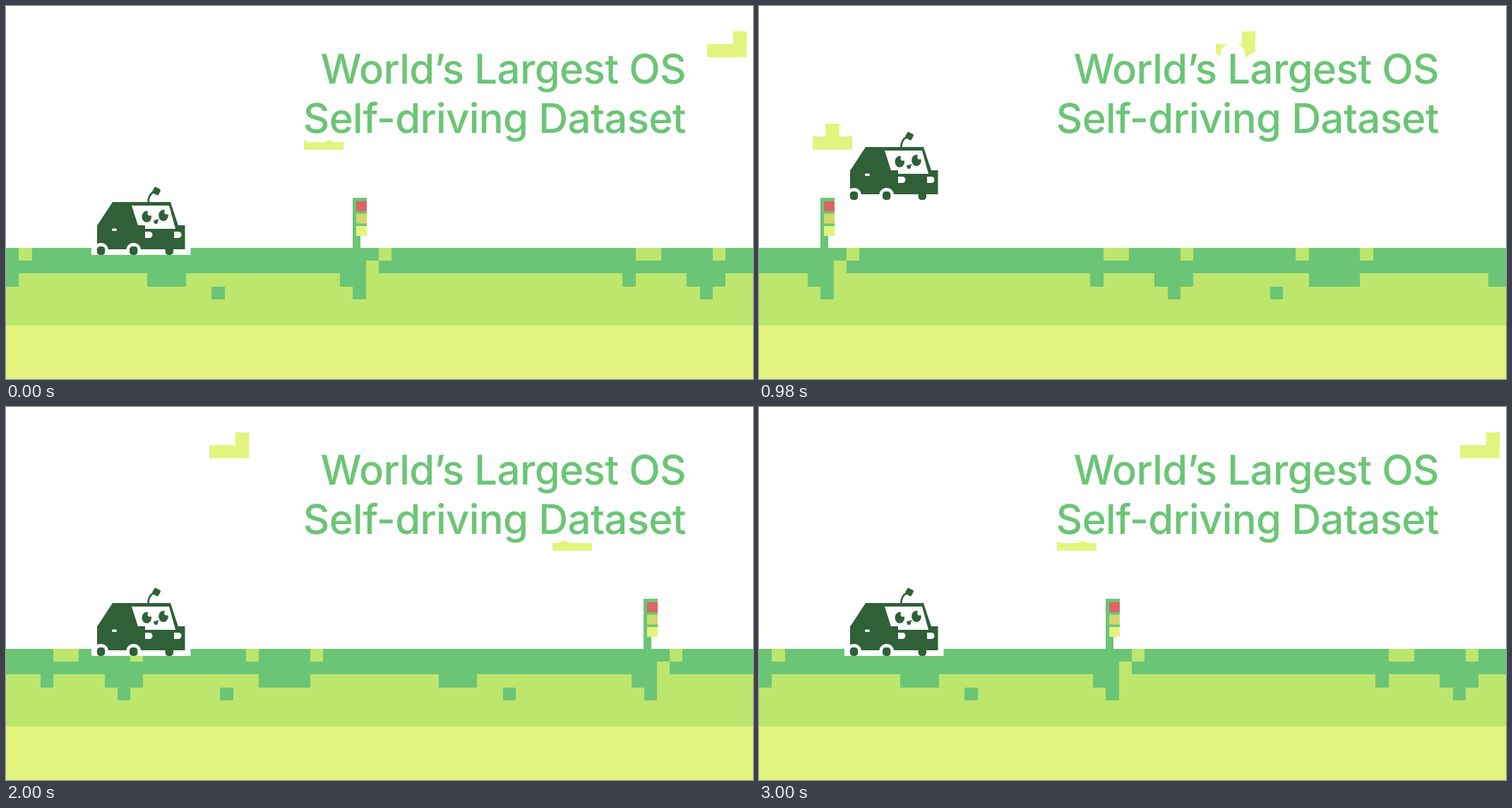
An HTML page with a canvas for the animation above (3040 ms loop, 1058 by 529 pixels).

```html
<!DOCTYPE html>
<html lang="en">
<head>
<meta charset="utf-8">
<title>Self-driving dataset</title>
<style>
  html, body { margin: 0; width: 100%; height: 100%; overflow: hidden; background: #fff; }
  canvas { display: block; }
</style>
</head>
<body>
<canvas id="stage" width="1058" height="529"></canvas>
<script>
const ctx = document.getElementById('stage').getContext('2d');
const W = 1058, H = 529;
const LOOP = 3040, TRAVEL = 3000, STEP = 20;
const GROUND = 1237, UNIT = GROUND / 68, SURFACE = 343;

const GREEN = '#6bc576', LEAF = '#bde66d', LIME = '#e2f47e';
const DARK = '#2f6037', RED = '#de6467', AMBER = '#d0d96c', WHITE = '#fff';

function box(color, x, y, w, h) {
  ctx.fillStyle = color;
  ctx.fillRect(x, y, w, h);
}

function oval(color, x, y, rx, ry = rx) {
  ctx.fillStyle = color;
  ctx.beginPath();
  ctx.ellipse(x, y, rx, ry, 0, 0, Math.PI * 2);
  ctx.fill();
}

function pill(color, x, y, w, h, radii) {
  ctx.fillStyle = color;
  ctx.beginPath();
  ctx.roundRect(x, y, w, h, radii);
  ctx.fill();
}

// Quadrilateral with level top and bottom edges
function trapezoid(top, topLeft, topRight, bottom, left, right) {
  const path = new Path2D();
  path.moveTo(topLeft, top);
  path.lineTo(topRight, top);
  path.lineTo(right, bottom);
  path.lineTo(left, bottom);
  path.closePath();
  return path;
}

// Calls draw for every visible copy of a strip that repeats each period
function repeat(x, period, draw) {
  for (const shift of [-period, 0, period]) draw(x + shift);
}

function cloud(x, y, bump) {
  x = Math.round(x);
  box(LIME, x, y + 18, 56, 18.7);
  box(LIME, x + bump, y, 19.5, 18);
}

function drawClouds(p) {
  repeat(993 - p * W, W, x => cloud(x, 36, 36.7));
  repeat(421.7 - p * W, W, x => cloud(x, 167, 18.3));
}

// The white halo hides passing clouds down to the lower line's edge
function drawTitle() {
  const lines = ['World’s Largest OS', 'Self-driving Dataset'];
  const eachLine = draw => lines.forEach((text, i) => draw(text, 963, 110 + 70 * i));
  ctx.font = '500 58px Inter, sans-serif';
  ctx.letterSpacing = '-0.58px';
  ctx.fontKerning = 'normal';
  ctx.textRendering = 'geometricPrecision';
  ctx.textAlign = 'right';
  ctx.lineJoin = 'round';
  ctx.lineWidth = 28;
  ctx.strokeStyle = WHITE;
  ctx.save();
  ctx.beginPath();
  ctx.rect(0, 0, W, 193);
  ctx.clip();
  eachLine((...line) => ctx.strokeText(...line));
  ctx.restore();
  ctx.fillStyle = GREEN;
  eachLine((...line) => ctx.fillText(...line));
}

function drawLight(x) {
  x = Math.round(x);
  box(GREEN, x, 272, 20, 54);
  box(GREEN, x, 326, 11, 18);
  [RED, AMBER, LIME].forEach((lamp, i) => box(lamp, x + 5, 277 + 17.5 * i, 15, 14));
}

function drawGround(p) {
  const shift = p * GROUND;
  const rowY = row => Math.round(SURFACE + row * UNIT);

  const tile = (color, row, col, width = 1) =>
    repeat(col * UNIT + 0.3 - shift, GROUND, x => {
      const left = Math.round(x), right = Math.round(x + width * UNIT);
      box(color, left, rowY(row), right - left, rowY(row + 1) - rowY(row));
    });
  const sprout = (col, width) => tile(LEAF, 0, col, width);
  const speck = col => tile(GREEN, 3, col);
  const notch = (col, width) => tile(GREEN, 2, col, width);
  const root = (col, width) => { notch(col, width); speck(col + 1); };

  box(GREEN, 0, SURFACE, W, 37);
  box(LEAF, 0, rowY(2), W, 453 - rowY(2));
  box(LIME, 0, 453, W, H - 453);

  notch(11, 3);
  speck(16);

  root(26, 2);
  tile(LEAF, 1, 28);
  sprout(29);

  notch(48, 1);
  sprout(49, 2);

  root(53, 3);
  sprout(55);

  speck(62);
  sprout(64);
  notch(65, 4);
  sprout(69);

  repeat(491 - shift, GROUND, drawLight);
}

const clamp = v => Math.min(1, Math.max(0, v));

function jump(t) {
  const rise = clamp((t - 420) / 240), fall = clamp((t - 850) / 240);
  return 110 * (1 - (1 - rise) ** 2 - fall ** 2);
}

function drawBody() {
  const cabin = trapezoid(278, 151, 233, 311.5, 129, 244);
  const hull = trapezoid(311, 129, 253.5, 345, 129, 253.5);
  ctx.lineJoin = 'miter';
  ctx.lineWidth = 16;
  ctx.strokeStyle = WHITE;
  for (const part of [cabin, hull]) ctx.stroke(part);
  ctx.fillStyle = DARK;
  for (const part of [cabin, hull]) ctx.fill(part);

  ctx.fillStyle = WHITE;
  ctx.fill(trapezoid(283, 178, 231, 316, 188.5, 240));
  box(DARK, 186, 311, 11, 5);
}

function drawAntenna() {
  ctx.strokeStyle = DARK;
  ctx.lineWidth = 2.6;
  ctx.beginPath();
  ctx.moveTo(201.3, 279);
  ctx.quadraticCurveTo(201.5, 267, 210, 263.5);
  ctx.stroke();
  ctx.save();
  ctx.translate(213, 262.5);
  ctx.rotate(0.5);
  pill(DARK, -5, -4.7, 10, 9.4, 2);
  ctx.restore();
}

function drawEye(x, y) {
  oval(DARK, x, y, 6.8, 8);
  oval(WHITE, x + 4.6, y - 4.8, 3.4);
}

function drawFace() {
  drawEye(199.3, 298.8);
  drawEye(223, 297);
  pill(DARK, 209.5, 303.5, 5.5, 5.5, [1, 1, 2.7, 2.7]);
  box(DARK, 213.5, 302.6, 3, 1.6);
}

function drawVan(t) {
  ctx.save();
  ctx.translate(0, -Math.round(jump(t)));
  ctx.beginPath();
  ctx.rect(100, 240, 180, 113);
  ctx.clip();

  drawBody();
  drawAntenna();
  drawFace();

  for (const x of [197, 238]) pill(WHITE, x, 320, 10.5, 9, [0, 4.5, 4.5, 0]);
  pill(WHITE, 150, 315.5, 7, 3.5, 1.5);
  for (const x of [134.5, 180.7]) pill(WHITE, x - 10.5, 336, 21, 24, 10);
  for (const x of [134.5, 180.7, 231.3]) pill(DARK, x - 5.7, 341, 11.4, 12, 4.5);
  ctx.restore();
}

const start = performance.now();

function frame() {
  const now = (performance.now() - start) % LOOP;
  const t = Math.min(TRAVEL, Math.floor(now / STEP) * STEP);
  const p = t / TRAVEL;
  box(WHITE, 0, 0, W, H);
  drawClouds(p);
  drawTitle();
  drawGround(p);
  drawVan(t);
  requestAnimationFrame(frame);
}
frame();
</script>
</body>
</html>
```
